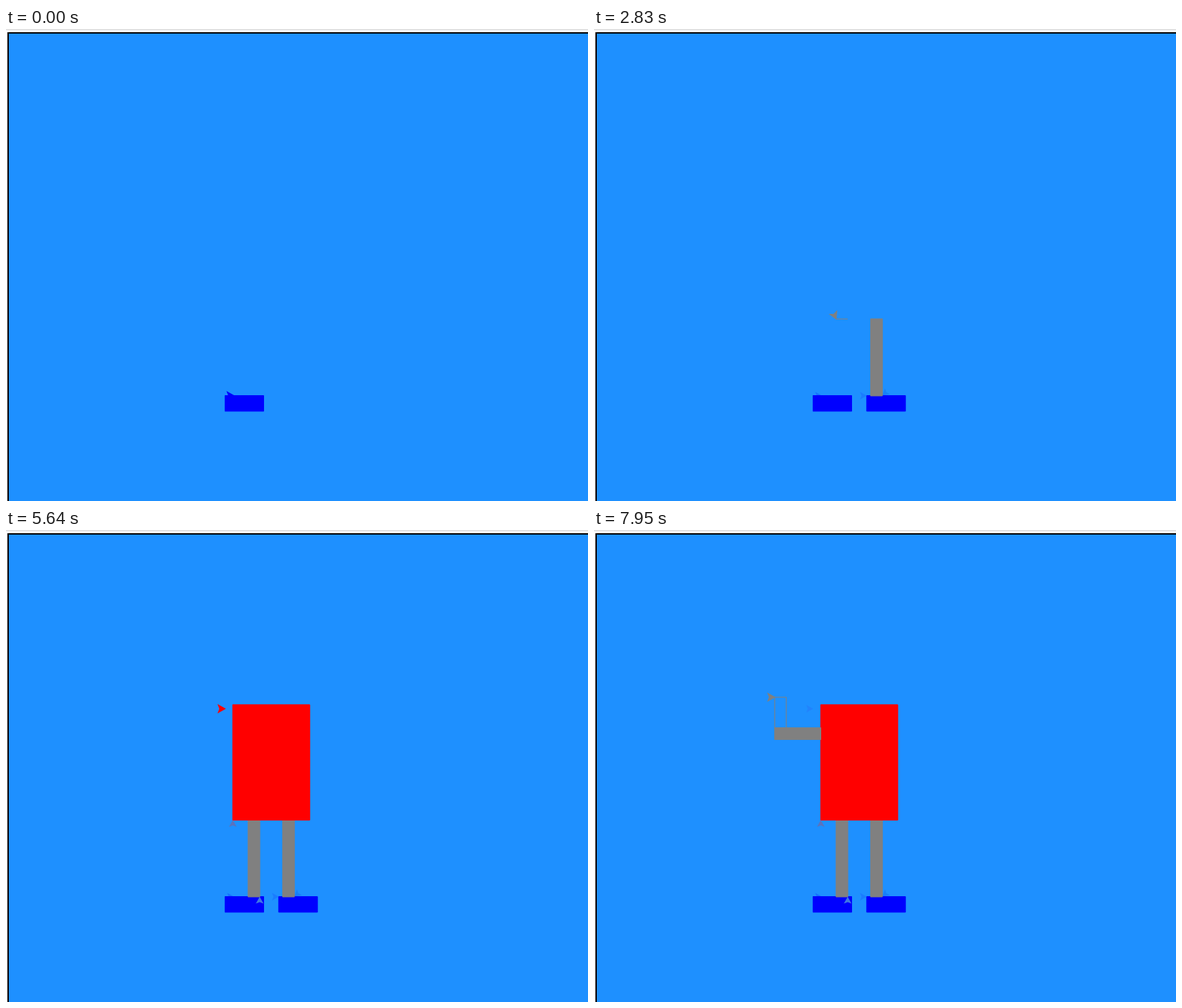
Recreate the animation shown at these times as an HTML page with a canvas. Size 830x675 px, loop 8000 ms.

```html
<!DOCTYPE html>
<html lang="en">
<head>
<meta charset="utf-8">
<title>Turtle robot</title>
<style>
  html, body { margin: 0; width: 100%; height: 100%; overflow: hidden; background: #fff; }
  canvas { display: block; }
</style>
</head>
<body>
<canvas id="stage" width="830" height="675"></canvas>
<script>
const ctx = document.getElementById('stage').getContext('2d');
const LOOP = 8000, FRAME = 70, SCALE = 1.095;
const HOP = 3 * 1.1 ** 3 * 3, TURN = 9;
const toX = x => 422 + SCALE * x;
const toY = y => 360.5 - SCALE * y;

// Turtle: every screen update is stored as one step.
const steps = [];
const turtle = { x: -100, y: -150, heading: 0, color: 'blue', pen: false };
const update = extra => steps.push({ ...turtle, ...extra });

function goTo(x, y) {
  const { x: x0, y: y0 } = turtle;
  const hops = 1 + Math.floor(Math.hypot(x - x0, y - y0) / HOP);
  for (let i = 1; i <= hops; i++) {
    turtle.x = x0 + (x - x0) * i / hops;
    turtle.y = y0 + (y - y0) * i / hops;
    update();
  }
}

function forward(distance) {
  const a = turtle.heading * Math.PI / 180;
  goTo(turtle.x + distance * Math.round(Math.cos(a)), turtle.y + distance * Math.round(Math.sin(a)));
}

function right(angle) {
  const start = turtle.heading, count = 1 + Math.floor(angle / TURN);
  for (let i = 1; i <= count; i++) {
    turtle.heading = start - angle * i / count;
    update();
  }
  update();
}

function rectangle(width, height, color) {
  const box = [turtle.x, turtle.y, width, height];
  turtle.pen = true;
  update();
  update();
  turtle.color = color;
  update();
  update();
  for (let i = 0; i < 2; i++) {
    forward(width);
    right(90);
    forward(height);
    right(90);
  }
  turtle.heading = 0;
  update({ box });
  turtle.pen = false;
  update();
}

update();
rectangle(50, 20, 'blue');
const base = steps.length;
const parts = [
  [-30, -150, 50, 20, 'blue'],
  [-25, -50, 15, 100, 'grey'],
  [-55, -50, -15, 100, 'grey'],
  [-90, 100, 100, 150, 'red'],
  [-150, 70, 60, 15, 'grey'],
  [-150, 110, 15, 40, 'grey']
];
for (const [x, y, w, h, color] of parts) {
  goTo(x, y);
  rectangle(w, h, color);
}

// Faint arrows that stay behind: [step, colour]
const trails = [
  [0, 'rgba(0,0,255,.22)'],
  [8, 'rgba(0,0,255,.13)'],
  [115, 'rgba(0,60,220,.2)'],
  [214, 'rgba(80,150,220,.8)'],
  [321, 'rgba(100,110,180,.85)'],
  [349, 'rgba(50,80,240,.2)']
];

// Pace: [ms, step]
const pace = [[0, 0], [1780, 115.3], [2830, 175.3], [4580, 283.3],
  [5640, 349.3], [6410, 396.3], [7950, 492.3]];

const ticks = [];
[0, 810, 1640, 5010, LOOP].forEach((start, i, all) => {
  for (let t = start; t < all[i + 1] - FRAME / 2; t += FRAME) ticks.push(t);
});

function stepAt(time) {
  const t = ticks.findLast(tick => tick <= time);
  const i = Math.max(1, pace.findIndex(p => p[0] >= t));
  const [t0, s0] = pace[i - 1], [t1, s1] = pace[i];
  return Math.floor(s0 + (s1 - s0) * (t - t0) / (t1 - t0));
}

function drawArrow({ x, y, heading }, color, outline = true) {
  ctx.save();
  ctx.translate(toX(x), toY(y));
  ctx.rotate(-heading * Math.PI / 180);
  ctx.scale(SCALE, SCALE);
  ctx.beginPath();
  ctx.moveTo(0, 0);
  ctx.lineTo(-9, 5);
  ctx.lineTo(-7, 0);
  ctx.lineTo(-9, -5);
  ctx.closePath();
  ctx.fillStyle = ctx.strokeStyle = color;
  ctx.lineWidth = 1;
  ctx.fill();
  if (outline) ctx.stroke();
  ctx.restore();
}

function drawScene() {
  const rect = (color, ...box) => { ctx.fillStyle = color; ctx.fillRect(...box); };
  rect('#fff', 0, 0, 830, 675);
  rect('#ccc', 0, 2, 830, 1);
  rect('#000', 2, 6, 828, 669);
  rect('#1e90ff', 4, 8, 826, 667);
}

function drawBox([x, y, w, h], color) {
  const box = [toX(x), toY(y), w * SCALE, h * SCALE];
  ctx.fillStyle = ctx.strokeStyle = color;
  ctx.fillRect(...box);
  ctx.strokeRect(...box);
}

function draw(time) {
  const n = stepAt(time), last = base + n;
  drawScene();
  ctx.lineWidth = SCALE;
  for (let i = 1; i <= last; i++) {
    const a = steps[i - 1], b = steps[i];
    if (b.box) drawBox(b.box, b.color);
    else if (b.pen && (a.x !== b.x || a.y !== b.y)) {
      ctx.strokeStyle = b.color;
      ctx.beginPath();
      ctx.moveTo(toX(a.x), toY(a.y));
      ctx.lineTo(toX(b.x), toY(b.y));
      ctx.stroke();
    }
  }
  for (const [step, color] of trails) {
    if (n > step) drawArrow(steps[base + step], color, false);
  }
  drawArrow(steps[last], steps[last].color);
}

const begin = performance.now();
function tick() {
  draw((performance.now() - begin) % LOOP);
  requestAnimationFrame(tick);
}
tick();
</script>
</body>
</html>
```
